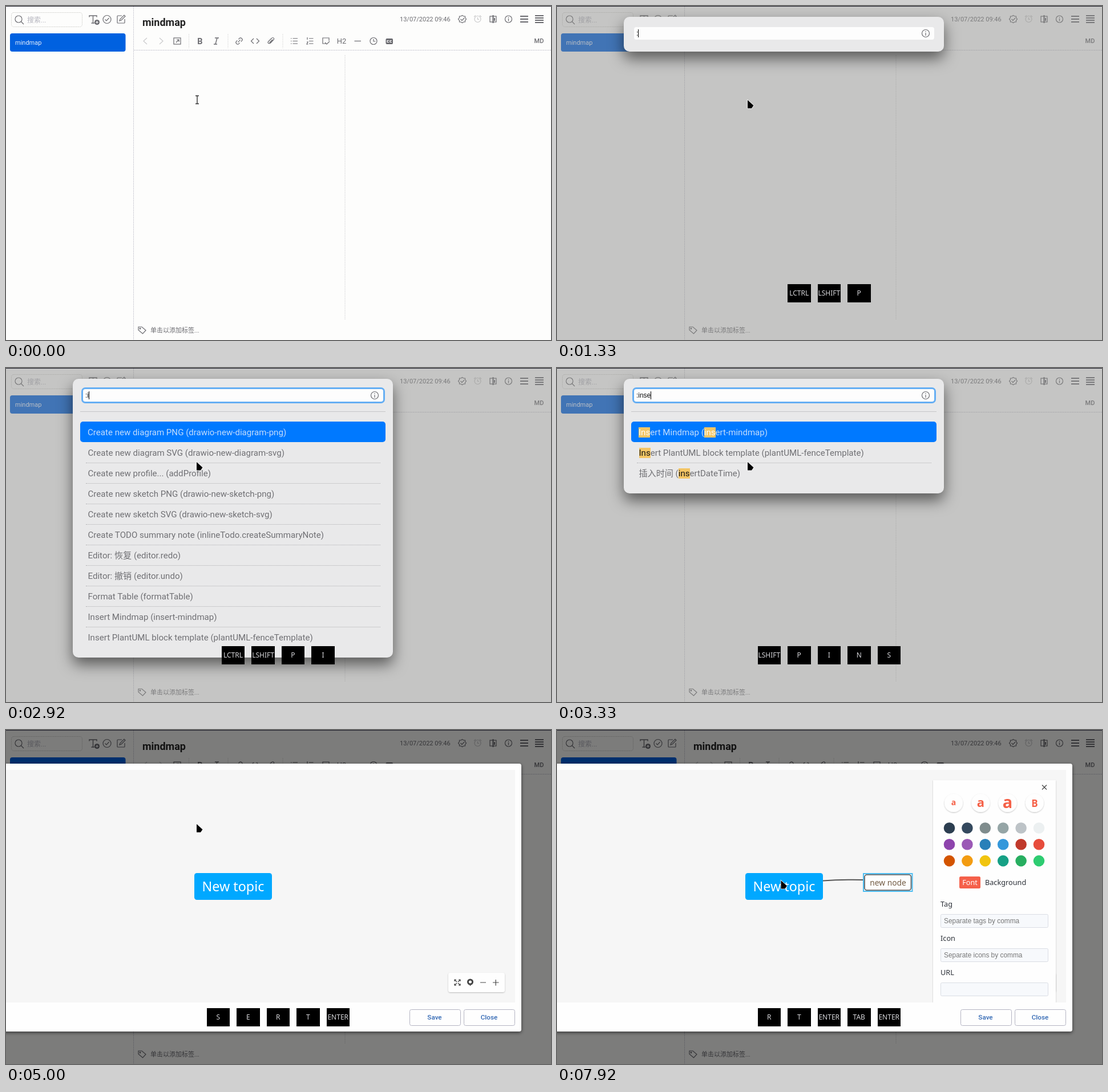
Recreate the animation shown at these times as an HTML page. Size 955 px wide and 586 px high, loop 8 s.

```html
<!DOCTYPE html>
<html lang="en">
<head>
<meta charset="utf-8">
<title>Mindmap note</title>
<style>
html, body { margin: 0; width: 100%; height: 100%; overflow: hidden; background: #fdfdfc; }
#stage { position: absolute; left: 0; top: 0; width: 955px; height: 586px; overflow: hidden; font-family: Roboto, "Noto Sans CJK SC", sans-serif; }
#stage > * { position: absolute; left: 0; top: 0; }
svg { display: block; overflow: hidden; }
.icons { fill: none; stroke: #6b6b70; stroke-width: 1.2; }
.ui { font: 11px Roboto, "Noto Sans CJK SC", sans-serif; fill: #6b6b70; stroke: none; }
.noto { font-family: "Noto Sans", sans-serif; }
.arial { font-family: "Liberation Sans", Arial, sans-serif; }
.mid { text-anchor: middle; }
.shade { top: 1px !important; width: 955px; height: 585px; }
#palette { left: 117px; top: 19px; width: 561px; height: 61px; border-radius: 10px; background: #e9e9ea; box-shadow: 0 12px 26px rgba(0,0,0,.55); }
#field { position: absolute; left: 18px; top: 18px; width: 526px; height: 22px; border-radius: 4px; background: #fdfdfd; font: 11.9px/22px "Liberation Sans", Arial, sans-serif; color: #111; white-space: pre; }
#field.focus { box-shadow: 0 0 0 3px #65aef3; }
#query { padding-left: 4px; }
#caret { display: inline-block; width: 1px; height: 14px; background: #000; vertical-align: -3px; }
#field svg { position: absolute; left: 503px; top: 3px; }
#results { position: absolute; left: 13px; top: 57px; width: 535px; border-top: 1px solid #c6c6c8; padding-top: 18px; }
.row { height: 35px; margin: 0 9.5px; padding-left: 4px; border-bottom: 1px dotted #b0b0b2; font-size: 15.08px; line-height: 36px; color: #707074; white-space: pre; overflow: hidden; }
.row:first-child { position: relative; top: -1px; height: 36px; margin: 0; padding-left: 13px; border: 0; border-radius: 5px; background: #0079ff; color: #c3dcfc; line-height: 38px; }
.row:last-child { border-color: transparent; }
mark { background: #f4c665; color: #111; }
.row:first-child mark { color: #fff; }
#keys { display: flex; gap: 12px; top: 488px !important; width: 953.5px; justify-content: center; }
#keys span { width: 40.5px; height: 31.5px; background: #000; color: #d8d8dc; font: 12px/32px "Noto Sans", sans-serif; text-align: center; }
</style>
</head>
<body>
<div id="stage">
<svg width="955" height="586">
  <rect width="955" height="586" fill="#fdfdfc"/>
  <path d="M0 .5H955" stroke="#20202c"/>
  <g fill="none" stroke="#c6c6d0" stroke-dasharray="2 1">
    <path d="M223.5 1V586M224 77.5H955"/>
    <path d="M320.5 49V74M389 49V74M485 49V74" stroke="#ddd"/>
    <path d="M594 86V551" stroke="#d8d8da"/>
    <rect x="9.500" y="11.500" width="124" height="25" rx="4" stroke="#d4d4d0"/>
  </g>
  <rect x="7" y="48" width="202.500" height="32" rx="4" fill="#0061e0"/>
  <g class="icons">
    <circle cx="22" cy="23" r="6"/><path d="M26.500 27.500L31 32"/>
    <path d="M146 19.500V17H159V19.500M152.500 17V30M149.500 30H155" stroke-width="1.400"/>
    <circle cx="159.500" cy="28.500" r="4.500" fill="#6b6b70" stroke="none"/><path d="M157 28.500H162M159.500 26V31" stroke="#fff"/>
    <circle cx="177" cy="23.500" r="7"/><path d="M173.500 23.500L176 26L180.500 21"/>
    <path d="M203 17H196Q195 17 195 18V29Q195 30 196 30H207Q208 30 208 29V23M199 26L200 23L207 16L209 18L202 25Z"/>
    <path d="M799.500 16.500L802 18H804.500V20.500L806.500 23L804.500 25.500V28H802L799.500 29.500L797 28H794.500V25.500L792.500 23L794.500 20.500V18H797Z"/><path d="M796.500 23L799 25.500L803 21"/>
    <g opacity=".35"><circle cx="826.500" cy="23" r="5.500"/><path d="M826.500 20V23.500H829M820 19L823 16.500M833 19L830 16.500"/></g>
    <rect x="848" y="18" width="11" height="10"/><path d="M853.500 16V30M856 21V26" stroke-width="2"/>
    <circle cx="880.500" cy="23" r="6"/><path d="M880.500 22V26.500M880.500 19.500V21"/>
    <path d="M901 18H915M901 23H915M901 28H915" stroke-width="2"/>
    <path d="M927 17H942M927 21H942M927 25H942M927 29H942" stroke-width="1.800"/>
    <path d="M247 56L241 61.500L247 67M269 56L275 61.500L269 67" opacity=".35"/>
    <rect x="294" y="56" width="12" height="11"/><path d="M298 64L303 59M299 59H303V63"/>
    <path d="M366 56H373M364 67H370M370 56L367 67" stroke-width="1.400"/>
    <g transform="rotate(-45 408.500 61.500)"><path d="M407 58.500H405A3 3 0 0 0 405 64.500H407M410 58.500H412A3 3 0 0 1 412 64.500H410M405.500 61.500H411.500"/></g>
    <path d="M434 57L429.500 61.500L434 66M439 57L443.500 61.500L439 66"/>
    <path d="M469 59L463 65Q460 67 459 64Q459 63 460 62L465 57Q468 54 469.500 57Q470 58 469 59L463.500 65Q462 65.500 462 64L467 59"/>
    <path d="M502.500 57H511M502.500 61.500H511M502.500 66H511M499 57H500.500M499 61.500H500.500M499 66H500.500M531 57H538.500M531 61.500H538.500M531 66H538.500M528 55V59M527 63H529L527 67H529.500"/>
    <path d="M561 66H555V56H566V61M559 64L562 67L567 62"/>
    <path d="M610.500 61.500H622"/>
    <circle cx="644" cy="61.500" r="6"/><path d="M644 58V62H647.500"/>
    <rect x="665.500" y="57" width="12.500" height="10" rx="2" fill="#6b6b70" stroke="none"/><path d="M671 60.500H668V63.500H671M676 60.500H673V63.500H676" stroke="#fff"/>
    <path d="M232 563H238L245 569L239.500 575L232 568.500Z"/><circle cx="235" cy="566" r=".8"/>
  </g>
  <g class="ui">
    <text x="37" y="28.500" style="font-size:12px;fill:#b5b5be">搜索...</text>
    <text x="16" y="67.500" style="fill:#e4eefc">mindmap</text>
    <text x="239" y="35" style="font-size:18px;font-weight:700;fill:#222">mindmap</text>
    <text x="690" y="27">13/07/2022 09:46</text>
    <text x="340" y="66.500" class="mid" style="font-size:14.500px;font-weight:700">B</text>
    <text x="588" y="66" class="mid" style="font-size:13px">H2</text>
    <text x="934" y="65" class="mid" style="font-weight:500">MD</text>
    <text x="253" y="573">单击以添加标签...</text>
  </g>
  <path id="editCaret" d="M230 91V111" stroke="#222"/>
</svg>

<div id="paletteShade" class="shade" style="background:rgba(136,136,135,.48)"></div>
<div id="palette">
  <div id="field"><span id="query"></span><span id="caret"></span>
    <svg width="16" height="16" class="icons"><circle cx="8" cy="8" r="6.500"/><path d="M8 7V12M8 4V5.500"/></svg>
  </div>
  <div id="results"></div>
</div>

<div id="mapShade" class="shade" style="background:rgba(0,0,0,.51)"></div>
<svg id="map" width="955" height="586">
  <defs>
    <filter id="soft" x="-20%" y="-20%" width="140%" height="140%"><feDropShadow dx="0" dy="2" stdDeviation="3" flood-opacity=".55"/></filter>
    <filter id="faint" x="-20%" y="-20%" width="140%" height="140%"><feDropShadow dx="0" dy="1" stdDeviation="1" flood-opacity=".25"/></filter>
    <clipPath id="canvasClip"><rect y="70" width="892" height="408"/></clipPath>
  </defs>
  <rect x="-20" y="59" width="923" height="470" rx="4" fill="#fefefe" filter="url(#soft)"/>
  <rect y="70" width="892" height="408" fill="#f6f6f6"/>
  <g fill="#fefefe" stroke="#b4b4c2"><rect x="707.500" y="490.500" width="89" height="28" rx="3"/><rect x="802.500" y="490.500" width="89" height="28" rx="3"/></g>
  <g class="ui mid" style="font-size:11.700px;font-weight:500;fill:#3268b4"><text x="751" y="508">Save</text><text x="846.500" y="508">Close</text></g>
  <rect x="775" y="426" width="99" height="34" rx="4" fill="#fefefe" filter="url(#faint)"/>
  <g class="icons" style="stroke:#444">
    <path d="M786 441V438H789M793 438H796V441M796 445V448H793M789 448H786V445M786 438L790 442M796 438L792 442M796 448L792 444M786 448L790 444"/>
    <circle cx="813.500" cy="442" r="4" stroke-width="3"/><path d="M813.500 446V449M831 443H841M853 443H863.500M858.200 438V448.500"/>
  </g>
  <path id="branch" d="M466 264.500C488 263 515 262.500 538 263" fill="none" stroke="#555" stroke-width="2"/>
  <rect id="rootRing" x="328.500" y="249.500" width="139" height="50" fill="none" stroke="#4dc4ff" stroke-width="2"/>
  <rect x="330" y="251" width="136" height="47" rx="4.500" fill="#00a8ff"/>
  <text x="398" y="283" class="noto mid" font-size="23.300" fill="#fff">New topic</text>
  <g id="child">
    <rect x="537" y="252" width="85.500" height="31" fill="#fefefe" stroke="#4dbcf0" stroke-width="2"/>
    <rect x="539" y="254" width="81.500" height="27" rx="4" fill="#fefefe" stroke="#555" stroke-width="1.600"/>
    <rect id="selection" x="547" y="258" width="66" height="19" fill="#3390ff"/>
    <text id="childText" x="580" y="272.500" class="noto mid" font-size="13.800">new node</text>
  </g>
  <g id="panel" clip-path="url(#canvasClip)">
    <rect x="659" y="88" width="215" height="410" fill="#fefefe" filter="url(#faint)"/>
    <path d="M850 96.500L858 104.500M858 96.500L850 104.500" stroke="#444" stroke-width="1.200"/>
    <g id="sizes" class="mid" fill="#f56148" font-weight="700" font-family="Open Sans, sans-serif"></g>
    <g id="swatches"></g>
    <rect x="705" y="257" width="37" height="21" rx="2.500" fill="#f5604a"/>
    <g class="noto" font-size="12.700" fill="#2c3038">
      <text x="723.500" y="272" class="mid" fill="#fff">Font</text><text x="750" y="272">Background</text>
      <text x="672" y="310">Tag</text><text x="672" y="370">Icon</text><text x="672" y="430">URL</text>
    </g>
    <g fill="#f7f9fc" stroke="#dadde4"><rect x="672.500" y="323.500" width="188" height="23" rx="2"/><rect x="672.500" y="383.500" width="188" height="23" rx="2"/><rect x="672.500" y="443.500" width="188" height="23" rx="2"/></g>
    <g class="arial" font-size="11.900" fill="#777"><text x="678" y="339">Separate tags by comma</text><text x="678" y="399">Separate icons by comma</text></g>
  </g>
</svg>

<div id="keys"></div>
<svg width="955" height="586" style="pointer-events:none">
  <path id="beam" d="M332 157.500H338M335 157.500V171.500M332 171.500H338" fill="none" stroke="#333" stroke-width="1.400"/>
  <path id="arrow" d="M0 0L10.500 9.500L7 14.500H0Z" stroke="#fff" stroke-width="1.400" paint-order="stroke"/>
</svg>
</div>
<script>
const LOOP = 8000;
const $ = id => document.getElementById(id);
const show = (id, on) => { $(id).style.display = on ? "" : "none"; };

const commands = [
  "Create new diagram PNG (drawio-new-diagram-png)",
  "Create new diagram SVG (drawio-new-diagram-svg)",
  "Create new profile... (addProfile)",
  "Create new sketch PNG (drawio-new-sketch-png)",
  "Create new sketch SVG (drawio-new-sketch-svg)",
  "Create TODO summary note (inlineTodo.createSummaryNote)",
  "Editor: 恢复 (editor.redo)",
  "Editor: 撤销 (editor.undo)",
  "Format Table (formatTable)",
  "Insert Mindmap (insert-mindmap)",
  "Insert PlantUML block template (plantUML-fenceTemplate)",
  "插入时间 (insertDateTime)"
];
const typing = [2825, 2995, 3160, 3325, 3495, 3660];
const keyPresses = [
  [1080, "LCTRL"], [1165, "LSHIFT"], [1250, "P"],
  ...typing.map((at, i) => [at + 85, "INSERT"[i]]),
  [4250, "ENTER"], [7000, "TAB"], [7750, "ENTER"]
];
const typedAt = t => "insert".slice(0, typing.filter(at => at <= t).length);

function fill(id, html) {
  const el = $(id);
  if (el.source !== html) el.innerHTML = el.source = html;
}

function resultRows(query) {
  const match = new RegExp(query, "gi");
  return commands
    .filter(c => c.toLowerCase().includes(query))
    .slice(0, 11)
    .map(c => `<div class="row">${query ? c.replace(match, "<mark>$&</mark>") : c}</div>`);
}

function drawPalette(t) {
  const open = t >= 1250 && t < 4250, listed = t >= 1500;
  show("paletteShade", open);
  show("palette", open);
  if (!open) return;
  const rows = resultRows(typedAt(t - 100));
  fill("query", ":" + typedAt(t));
  fill("results", rows.join(""));
  show("results", listed);
  $("field").className = listed ? "focus" : "";
  $("palette").style.height = (listed ? 93 + rows.length * 36 : 61) + "px";
  const lastKey = Math.max(1500, ...typing.filter(at => at <= t));
  $("caret").style.opacity = t < 1500 || (t - lastKey) % 1000 < 500 ? 1 : 0;
}

function drawMap(t) {
  const open = t >= 4500, added = t >= 7000, editing = t < 7750;
  show("mapShade", open);
  show("map", open);
  show("rootRing", t >= 6665 && !added);
  show("panel", t >= 6665);
  show("branch", added);
  show("child", added);
  show("selection", editing);
  $("childText").style.fill = editing ? "#fff" : "#735c45";
}

function drawPointer(t) {
  const beam = t < 1250 || (t >= 4250 && t < 4500);
  const p = Math.min(1, Math.max(0, (t - 6165) / 420));
  const ease = p * p * (3 - 2 * p);
  show("beam", beam);
  show("arrow", !beam);
  $("arrow").setAttribute("transform", `translate(${334 + 58.5 * ease} ${165 + 99 * ease})`);
}

function draw(t) {
  show("editCaret", t >= 420 && t < 920);
  drawPalette(t);
  drawMap(t);
  drawPointer(t);
  fill("keys", keyPresses.filter(([at]) => at <= t).slice(-5).map(([, k]) => `<span>${k}</span>`).join(""));
}

const palette = ("2c3e50 34495e 7f8c8d 95a5a6 bdc3c7 ecf0f1 8e44ad 9b59b6 2980b9 " +
  "3498db c0392b e74c3c d35400 f39c12 f1c40f 16a085 27ae60 2ecc71").split(" ");
$("swatches").innerHTML = palette.map((c, i) =>
  `<circle cx="${687.5 + 31.4 * (i % 6)}" cy="${172 + 28.8 * Math.floor(i / 6)}" r="9.8" fill="#${c}"/>`).join("");
$("sizes").innerHTML = [["a", 14, 132], ["a", 22, 134.5], ["a", 29, 137], ["B", 17, 134.5]].map(([s, size, y], i) =>
  `<circle cx="${695 + 47.3 * i}" cy="128" r="16" fill="#fefefe" filter="url(#faint)"/>
   <text x="${695 + 47.3 * i}" y="${y}" font-size="${size}">${s}</text>`).join("");

const start = performance.now();
function tick() {
  draw((performance.now() - start) % LOOP);
  requestAnimationFrame(tick);
}
tick();
</script>
</body>
</html>
```
